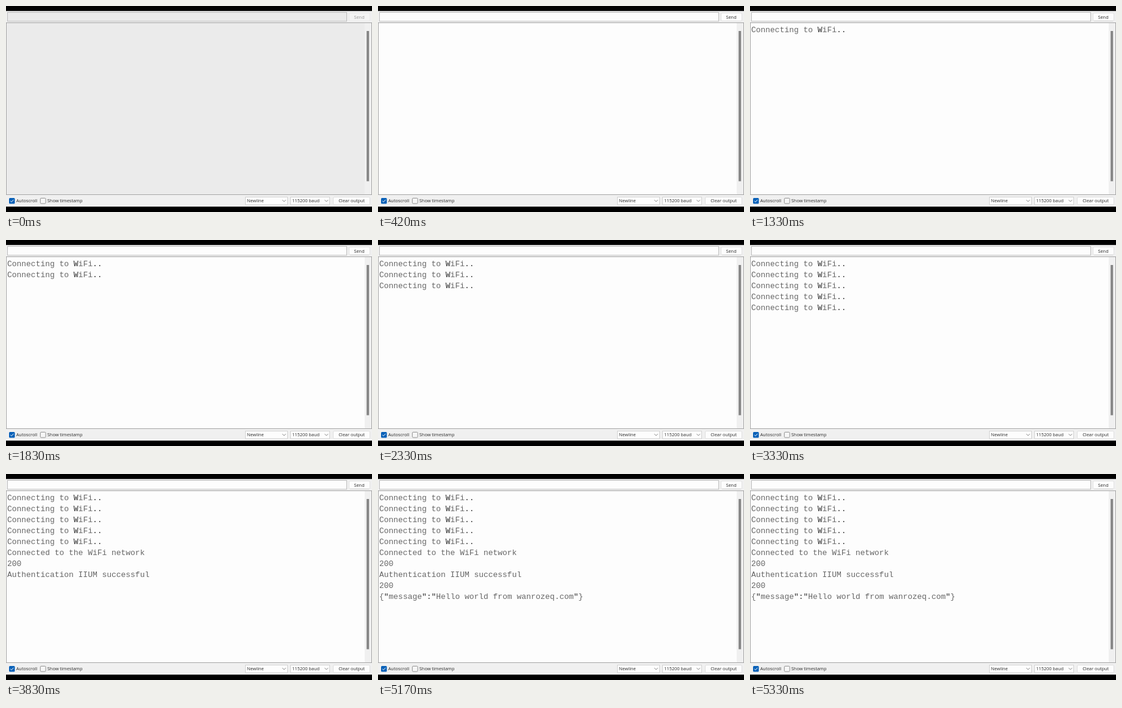
Write an HTML page that moves like this. It is 600 by 338 pixels and loops after 8000 ms.

```html
<!DOCTYPE html>
<html lang="en">
<head>
<meta charset="utf-8">
<title>Serial monitor</title>
<style>
  html, body { margin: 0; width: 100%; height: 100%; overflow: hidden; background: #000; }
  svg { position: absolute; left: 0; top: 0; display: block; }
  svg text { font: 7.4px "Open Sans", "Noto Sans", sans-serif; fill: #2b2b2b; }
  .line { fill: none; stroke: #a6a6a6; }
  .box { fill: #fdfdfd; stroke: #d2d2d2; }
  .button { fill: #fdfdfd; stroke: #dedede; }
  .arrow { fill: none; stroke: #777; stroke-width: .9; }

  .field, .label, .face, .edge, .log { animation: 8s step-end infinite; }
  .field { animation-name: field; }
  svg .label { animation-name: label; }
  .face { animation-name: face; }
  .edge { animation-name: edge; }

  .log {
    position: absolute; left: 2px; top: 31px; width: 580px;
    margin: 0; overflow: hidden; white-space: pre;
    font: 12.96px/18px "Liberation Mono", "Courier New", monospace;
    color: #666;
    animation-name: log;
  }
  .log b { font-weight: normal; color: #303030; }

  @keyframes field { 0% { fill: #ebebeb; } 5.25%, 100% { fill: #fdfdfd; } }
  @keyframes label { 0% { fill: #9a9a9a; } 5.25%, 100% { fill: #2b2b2b; } }
  @keyframes face {
    0% { fill: #f4f4f4; stroke: #ebebeb; }
    5.25%, 100% { fill: #fdfdfd; stroke: #e2e2e2; }
  }
  @keyframes edge { 0% { opacity: 0; } 8.375%, 100% { opacity: 1; } }
  /* one 18px row per printed line */
  @keyframes log {
    0% { height: 0; }
    16.625% { height: 18px; }
    22.875% { height: 36px; }
    29.125% { height: 54px; }
    35.375% { height: 72px; }
    41.625% { height: 90px; }
    42.75% { height: 144px; }
    64.625%, 100% { height: 180px; }
  }
</style>
</head>
<body>
<svg width="600" height="338" viewBox="0 0 600 338">
  <rect width="600" height="338"/>
  <rect y="8.2" width="600" height="321" fill="#f0f0f0"/>

  <rect class="field" x="2.5" y="10.5" width="556" height="14.5" stroke="#bcbcbc"/>
  <rect class="face" x="562.5" y="11.5" width="34" height="13" rx="1.5"/>
  <path class="edge" d="M564 24.5H595" stroke="#cdcdcd"/>
  <text class="label" x="570.4" y="20.5">Send</text>

  <rect class="field" x="1" y="28" width="587" height="281"/>
  <rect x="588" y="28" width="11" height="281" fill="#f0f0f0"/>
  <rect class="line" x=".5" y="27.5" width="599" height="282"/>
  <rect x="591.2" y="41" width="4" height="246.5" fill="#858585"/>

  <rect x="5" y="315" width="9.5" height="9.5" rx="1.5" fill="#0860b8"/>
  <path d="M7.2 319.8L9 321.6L12.4 317.8" fill="none" stroke="#fff"/>
  <text x="16.7" y="322.4">Autoscroll</text>
  <rect x="56.3" y="315.3" width="8.8" height="8.8" rx="1.5" fill="#f7f7f7" stroke="#858585" stroke-width=".9"/>
  <text x="67.8" y="322.4">Show timestamp</text>

  <rect class="box" x="392.5" y="313.5" width="69" height="12.5"/>
  <text x="395" y="322.4">Newline</text>
  <path class="arrow" d="M453 318.2L455.8 321L458.6 318.2"/>
  <rect class="box" x="466.5" y="313.5" width="64" height="12.5"/>
  <text x="469" y="322.4">115200 baud</text>
  <path class="arrow" d="M522.5 318.2L525.3 321L528.1 318.2"/>
  <rect class="button" x="536.5" y="313.5" width="60" height="12.5" rx="1.5"/>
  <text x="545.2" y="322.4">Clear output</text>
</svg>
<pre class="log">Connecting to <b>W</b>iFi<b>..</b>
Connecting to <b>W</b>iFi<b>..</b>
Connecting to <b>W</b>iFi<b>..</b>
Connecting to <b>W</b>iFi<b>..</b>
Connecting to <b>W</b>iFi<b>..</b>
Connected to the WiFi network
200
Authentication IIUM successful
200
{<b>"</b>message<b>":"</b>Hello world from wanrozeq.com<b>"</b>}</pre>
</body>
</html>
```
